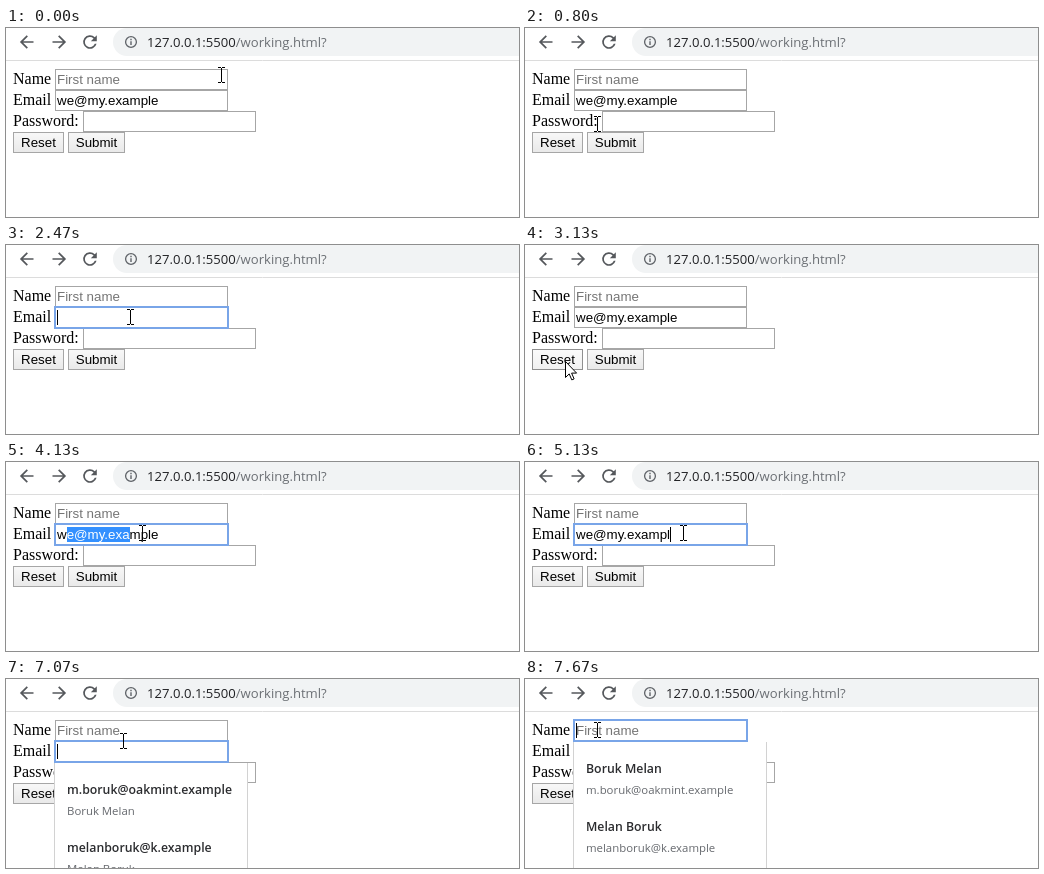
Recreate the animation shown at these times as an HTML page. Size 513 by 189 pixels, loop 8 s.

```html
<!DOCTYPE html>
<html lang="en">
<head>
<meta charset="utf-8">
<title>Form reset</title>
<style>
  html, body { margin: 0; width: 100%; height: 100%; overflow: hidden; background: #fff; }
  svg { display: block; width: 513px; height: 189px; }
  text { white-space: pre; }
  .label { font: 16px "Liberation Serif", serif; }
  .field { font: 13.333px "Liberation Sans", sans-serif; }
  .url { font: 13.1px "Open Sans", sans-serif; fill: #202124; }
  .main { font: 600 12.3px "Open Sans", sans-serif; fill: #2b2c2f; }
  .sub { font: 11.4px "Open Sans", sans-serif; fill: #66696e; }
  .icon { fill: #55585c; }
  .box { fill: #fff; stroke: #a6a6a6; }
  .ring { fill: none; stroke: #79a5e8; stroke-width: 2; }
</style>
</head>
<body>
<svg viewBox="0 0 513 189">
  <defs>
    <linearGradient id="face" x2="0" y2="1">
      <stop stop-color="#f8f8f8"/><stop offset="1" stop-color="#e9e9e9"/>
    </linearGradient>
    <linearGradient id="hot" x2="0" y2="1">
      <stop stop-color="#fbfbfb"/><stop offset="1" stop-color="#f0f0f0"/>
    </linearGradient>
    <path id="arrow" d="M20 11H7.83l5.59-5.59L12 4l-8 8 8 8 1.41-1.41L7.83 13H20z"/>
  </defs>

  <!-- toolbar -->
  <g class="icon">
    <use href="#arrow" transform="translate(10.5 3.8) scale(.85)"/>
    <use href="#arrow" transform="translate(63.5 3.8) scale(-.85 .85)"/>
    <path transform="translate(73.8 3.8) scale(.85)" d="M17.65 6.35A8 8 0 1 0 19.73 14H17.65A6 6 0 1 1 16.22 7.78L13 11h7V4z"/>
  </g>
  <path d="M513 0H121a14 14 0 0 0 0 28H513z" fill="#f1f3f4"/>
  <circle cx="125" cy="14" r="5.4" fill="none" stroke="#5f6368" stroke-width="1.3"/>
  <path d="M125 13.3v3.7M125 10.8v1.4" stroke="#5f6368" stroke-width="1.4"/>
  <text class="url" x="141" y="18.5">127.0.0.1:5500<tspan fill="#6b6f74">/working.html?</tspan></text>
  <path d="M0 32.5H513" stroke="#dcdcdc"/>

  <!-- form -->
  <g class="label">
    <text x="7" y="56">Name</text>
    <text x="7" y="77">Email</text>
    <text x="7" y="98">Password:</text>
  </g>
  <rect class="box" x="49.5" y="41.5" width="172" height="20"/>
  <rect class="box" x="49.5" y="62.5" width="172" height="20"/>
  <rect class="box" x="77.5" y="83.5" width="172" height="20"/>
  <rect id="reset" x="7.5" y="104.5" width="50" height="20" stroke="#a6a6a6"/>
  <rect x="62.5" y="104.5" width="56" height="20" fill="url(#face)" stroke="#a6a6a6"/>
  <g class="field">
    <text x="51" y="56" fill="#757575">First name</text>
    <rect id="mark" y="65" height="15" fill="#3390ff"/>
    <text x="51" y="77"><tspan id="pre"></tspan><tspan id="mid" fill="#fff"></tspan><tspan id="post"></tspan></text>
    <text x="32.5" y="119" text-anchor="middle">Reset</text>
    <text x="90.5" y="119" text-anchor="middle">Submit</text>
  </g>
  <rect id="ring" class="ring" x="49" width="173" height="21"/>
  <rect id="caret" width="1" height="15"/>

  <!-- suggestions -->
  <g id="list">
    <rect x="48" y="0" width="194" height="140" fill="#000" opacity=".08"/>
    <rect x="49" y="0" width="192" height="140" fill="#fff"/>
    <path d="M48.5 0V140M241.5 0V140" stroke="#d2d2d2"/>
    <text class="main" x="61" y="31"></text>
    <text class="sub" x="61" y="52"></text>
    <text class="main" x="61" y="89"></text>
    <text class="sub" x="61" y="110"></text>
  </g>

  <path id="beam" d="M-3-8h3v1h-3zM1-8h3v1h-3zM0-7h1V7h-1zM-3 7h3v1h-3zM1 7h3v1h-3z"/>
  <path id="hand" d="M.5.5v16l3.7-3.6 2.6 6 2.3-1-2.5-5.8h5z" fill="#fff" stroke="#000"/>
</svg>
<script>
const $ = id => document.getElementById(id);
const LOOP = 8000, TICK = 1000 / 15, LEFT = 51;
const EMAIL = 'we@my.example';
const PEOPLE = [
  ['Boruk Melan', 'm.boruk@oakmint.example'],
  ['Melan Boruk', 'melanboruk@k.example']
];

// pointer stops: tick, x, y
const PATH = [
  [0, 215, 47], [4, 101, 86], [7, 101, 86], [18, 35, 110], [20, 35, 110], [21, 34, 110],
  [22, 34, 110], [29, 126, 71], [36, 126, 71], [37, 124, 72], [45, 40, 120], [47, 40, 116],
  [50, 40, 116], [56, 65, 68], [58, 65, 68], [62, 136, 71], [68, 150, 71], [69, 150, 71],
  [76, 158, 71], [102, 158, 71], [110, 76, 53], [115, 72, 51], [120, 72, 51]
];

const pen = document.createElement('canvas').getContext('2d');
pen.font = '13.333px "Liberation Sans", sans-serif';
const width = n => pen.measureText(EMAIL.slice(0, n)).width;
const within = (k, a, b) => k >= a && k < b;
const show = (el, on) => el.setAttribute('visibility', on ? 'visible' : 'hidden');

function set(el, attrs) {
  for (const name in attrs) el.setAttribute(name, attrs[name]);
}

function pointer(k) {
  const i = PATH.findIndex((p, j) => j && k <= p[0]);
  const [a, b] = [PATH[i - 1], PATH[i]];
  const u = (k - a[0]) / (b[0] - a[0]), e = u * u * (3 - 2 * u);
  return [1, 2].map(c => Math.round(a[c] + (b[c] - a[c]) * e));
}

// number of characters left of x
function hit(x) {
  let n = 0;
  while (n < EMAIL.length && LEFT + (width(n) + width(n + 1)) / 2 < x) n++;
  return n;
}

function letters(k) {
  if (within(k, 34, 46) || k >= 101) return 0;
  if (k < 77) return EMAIL.length;
  if (k < 80) return 12;
  if (k < 82) return 11;
  return Math.max(2, 10 - Math.floor((k - 82) / 2));
}

function selection(k, x) {
  if (within(k, 31, 34)) return [0, EMAIL.length];
  if (within(k, 59, 73)) return [1, Math.max(1, hit(x - 8))];
  return [0, 0];
}

function draw(t) {
  const k = Math.floor((t + 4) / TICK) % 120;
  const [x, y] = pointer(k);
  const n = letters(k), text = EMAIL.slice(0, n);
  const [from, to] = selection(k, x);

  $('pre').textContent = text.slice(0, from);
  $('mid').textContent = text.slice(from, to);
  $('post').textContent = text.slice(to);
  const start = Math.round(LEFT + width(from));
  set($('mark'), { x: start, width: Math.round(LEFT + width(to)) - start });

  const onName = k >= 111;
  const onEmail = within(k, 29, 46) || within(k, 59, 111);
  show($('ring'), onName || onEmail);
  set($('ring'), { y: onName ? 41 : 62 });

  const at = onName ? 0 : within(k, 29, 31) ? hit(x) : n;
  show($('caret'), (onName || onEmail) && from === to);
  set($('caret'), { x: Math.round(LEFT + width(at)), y: onName ? 44 : 65 });

  const over = within(x, 7, 58) && within(y, 104, 125);
  const down = within(k, 22, 24) || k === 46;
  set($('reset'), {
    fill: down ? '#e3e3e3' : over ? 'url(#hot)' : 'url(#face)',
    stroke: over ? '#8f8f8f' : '#a6a6a6'
  });

  show($('list'), within(k, 101, 111) || k >= 113);
  set($('list'), { transform: `translate(0 ${onName ? 63 : 84})` });
  const rows = PEOPLE.flatMap(p => onName ? p : [p[1], p[0]]);
  $('list').querySelectorAll('text').forEach((el, i) => { el.textContent = rows[i]; });

  const beam = y < 104;
  show($('beam'), beam);
  show($('hand'), !beam);
  set($(beam ? 'beam' : 'hand'), { transform: `translate(${x} ${y})` });
}

const t0 = performance.now();
function loop() {
  draw((performance.now() - t0) % LOOP);
  requestAnimationFrame(loop);
}
draw(0);
requestAnimationFrame(loop);
</script>
</body>
</html>
```
